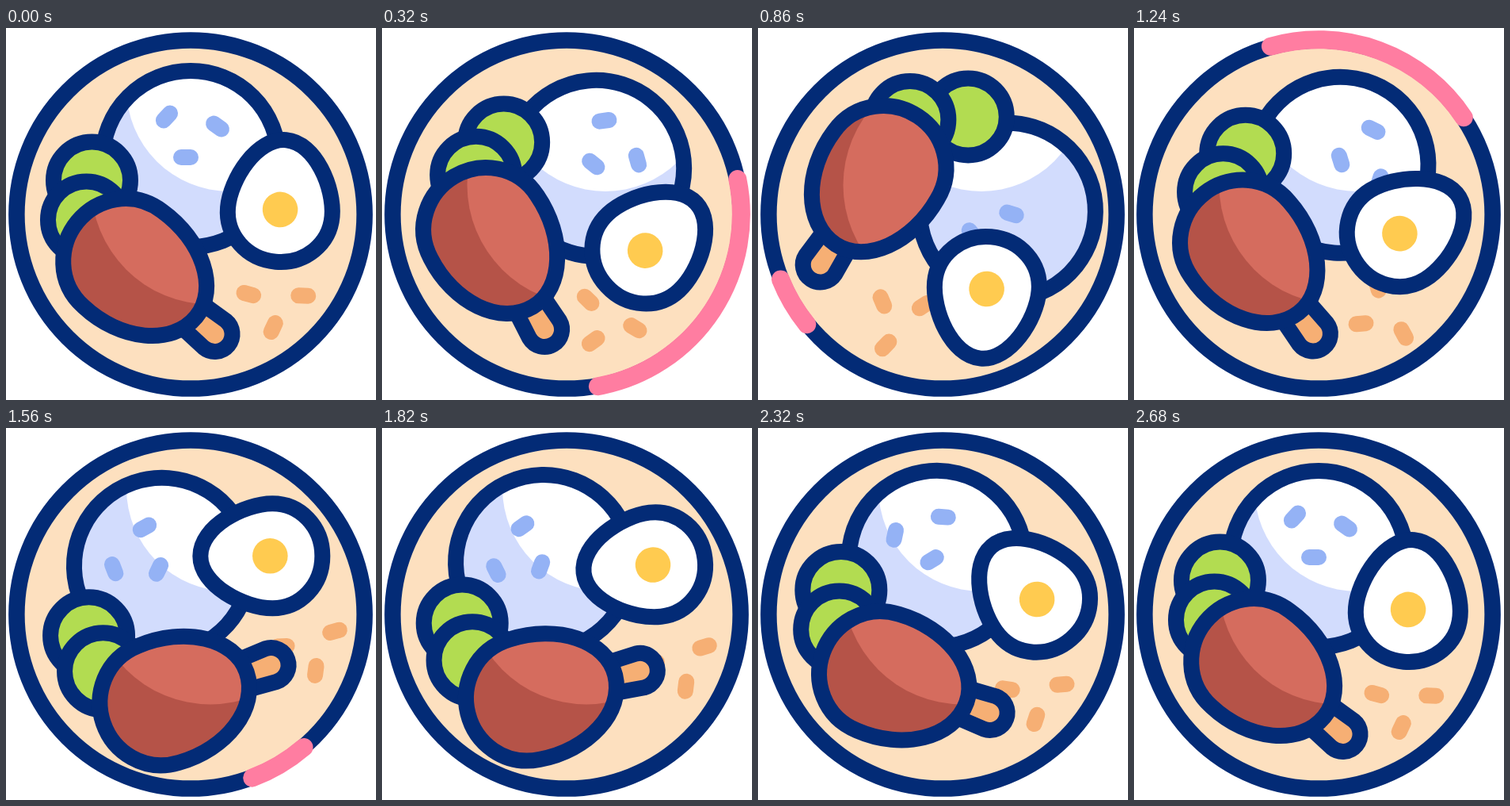
Animation, 467 px wide and 469 px high, one loop 3020 ms. Source, as an HTML page with a canvas:

```html
<!DOCTYPE html>
<html lang="en">
<head>
<meta charset="utf-8">
<title>Plate</title>
<style>
  html, body { margin: 0; width: 100%; height: 100%; overflow: hidden; background: #fff; }
  canvas { display: block; }
</style>
</head>
<body>
<canvas id="stage" width="467" height="469"></canvas>
<script>
const ctx = document.getElementById('stage').getContext('2d');
const LOOP = 3020, CX = 233, CY = 235, DEG = Math.PI / 180;
const NAVY = '#032b76', ORANGE = '#f6af74';
const TIMES = [0, 320, 860, 1240, 1560, 2040, 2680];

// Smooth curve through values at TIMES, at rest (0) on both ends.
function track(t, values) {
  if (!values || t >= 2680) return 0;
  const v = [0, ...values, 0];
  const slope = i => {
    if (i === 0 || i === 6) return 0;
    const turns = (v[i] - v[i - 1]) * (v[i + 1] - v[i]) < 0;
    return (v[i + 1] - v[i - 1]) / (TIMES[i + 1] - TIMES[i - 1]) * (turns ? 0.4 : 1);
  };
  let i = 0;
  while (t >= TIMES[i + 1]) i++;
  const d = TIMES[i + 1] - TIMES[i], u = (t - TIMES[i]) / d, w = 1 - u;
  return v[i] * (1 + 2 * u) * w * w + v[i + 1] * u * u * (3 - 2 * u)
    + d * u * w * (slope(i) * w - slope(i + 1) * u);
}

// Every part orbits the plate centre (angle, radius) and turns on itself.
const parts = [
  { draw: crumbs, angle: 47.4, radius: 157, turn: 0,
    orbit: [23, 66.5, 11, -31, -13], reach: [-11.6, -15.4, -9, 1, 0], spin: [29, 132, 60, -17.5, -13.5] },
  { draw: rice, angle: -90, radius: 70, turn: 0,
    orbit: [32.5, 87, 24, -30.5, -14], reach: [-1, 12, -2, 1, 1], spin: [39, 197, 73, -64, -61] },
  { draw: egg, angle: -8.5, radius: 115.3, turn: 5,
    orbit: [28, 71, 18, -31, -13], reach: [-1.5, 3, -2, 0.5, 0], spin: [42, 180, 54, -95, -90] },
  { draw: cucumber, angle: 199, radius: 131.7, turn: 0,
    orbit: [29.8, 85.7, 20.9, -30.8, -13.6], reach: [-11, -4.5, -11.7, -0.5, 0] },
  { draw: cucumber, angle: 177, radius: 131.7, turn: 0,
    orbit: [26.4, 74, 16.3, -30, -13], reach: [-7, -5.4, -8, 0, 0] },
  { draw: chicken, angle: 134.4, radius: 97.9, turn: 39.3,
    orbit: [25, 73, 15.8, -34, -17], reach: [1.5, -3.3, 0.6, 9.8, 6.5], spin: [20, 84, 13.2, -58.4, -40.8] }
];

const eggShape = new Path2D('M0-77C37-77 66-22 66 14C66 49 37 77 0 77C-37 77-66 49-66 14C-66-22-37-77 0-77Z');
const legShape = new Path2D('M-96 0C-96-38-68-76-22-78C40-82 96-48 96-2C96 46 40 82-22 78C-68 76-96 38-96 0Z');
const boneShape = new Path2D('M80-19L128-22A22 22 0 0 1 128 22L80 19Z');

function disc(r) {
  const p = new Path2D();
  p.arc(0, 0, r, 0, 7);
  return p;
}

function fill(path, color) {
  ctx.fillStyle = color;
  ctx.fill(path);
}

function outline(path, width = 20) {
  ctx.strokeStyle = NAVY;
  ctx.lineWidth = width;
  ctx.stroke(path);
}

function grain(x, y, tilt, color) {
  const dx = 6 * Math.cos(tilt * DEG), dy = 6 * Math.sin(tilt * DEG);
  ctx.strokeStyle = color;
  ctx.lineWidth = 20;
  ctx.beginPath();
  ctx.moveTo(x - dx, y - dy);
  ctx.lineTo(x + dx, y + dy);
  ctx.stroke();
}

// The light stays fixed on the stage while the shape moves through it.
function shaded(path, dark, light, x, y, r) {
  fill(path, dark);
  ctx.save();
  ctx.clip(path);
  ctx.resetTransform();
  ctx.translate(x, y);
  fill(disc(r), light);
  ctx.restore();
}

function crumbs() {
  grain(-33, -15, 15, ORANGE);
  grain(36, -13, 2, ORANGE);
  grain(-2, 27, -65, ORANGE);
}

function rice() {
  const bowl = disc(111);
  shaded(bowl, '#d2dcfd', '#fff', 282, 76, 130);
  grain(-30, -53, -47, '#94b2f5');
  grain(34, -41, 35, '#94b2f5');
  grain(-6, -2, 0, '#94b2f5');
  outline(bowl);
}

function egg() {
  fill(eggShape, '#fff');
  outline(eggShape);
  ctx.translate(0, 11);
  fill(disc(22.3), '#ffcb50');
}

function cucumber() {
  const slice = disc(48.5);
  fill(slice, '#b2dc51');
  outline(slice);
}

function chicken() {
  fill(boneShape, ORANGE);
  outline(boneShape);
  shaded(legShape, '#b55348', '#d56c5e', 258, 198, 150.5);
  outline(legShape);
}

function ease(t, start, length) {
  const u = Math.min(1, Math.max(0, (t - start) / length));
  return u * u * (3 - 2 * u);
}

function glint(t) {
  const head = -107 + 248 * ease(t, 0, 475) + 289 * ease(t, 735, 850);
  const tail = -107 + 248 * ease(t, 0, 760) + 289 * ease(t, 908, 780);
  if (head - tail < 0.3) return;
  ctx.strokeStyle = '#ff7da1';
  ctx.lineWidth = 23;
  ctx.beginPath();
  ctx.arc(CX, CY, 220.3, tail * DEG, head * DEG);
  ctx.stroke();
}

function render(t) {
  ctx.resetTransform();
  ctx.clearRect(0, 0, 467, 469);
  ctx.lineCap = ctx.lineJoin = 'round';
  ctx.translate(CX, CY);
  const plate = disc(219.6);
  fill(plate, '#fde0bf');
  outline(plate, 20.5);
  for (const p of parts) {
    const a = (p.angle + track(t, p.orbit)) * DEG, r = p.radius + track(t, p.reach);
    ctx.save();
    ctx.translate(r * Math.cos(a), r * Math.sin(a));
    ctx.rotate((p.turn + track(t, p.spin)) * DEG);
    p.draw();
    ctx.restore();
  }
  ctx.resetTransform();
  glint(t);
}

const began = performance.now();
function tick() {
  render((performance.now() - began) % LOOP);
  requestAnimationFrame(tick);
}
tick();
</script>
</body>
</html>
```
